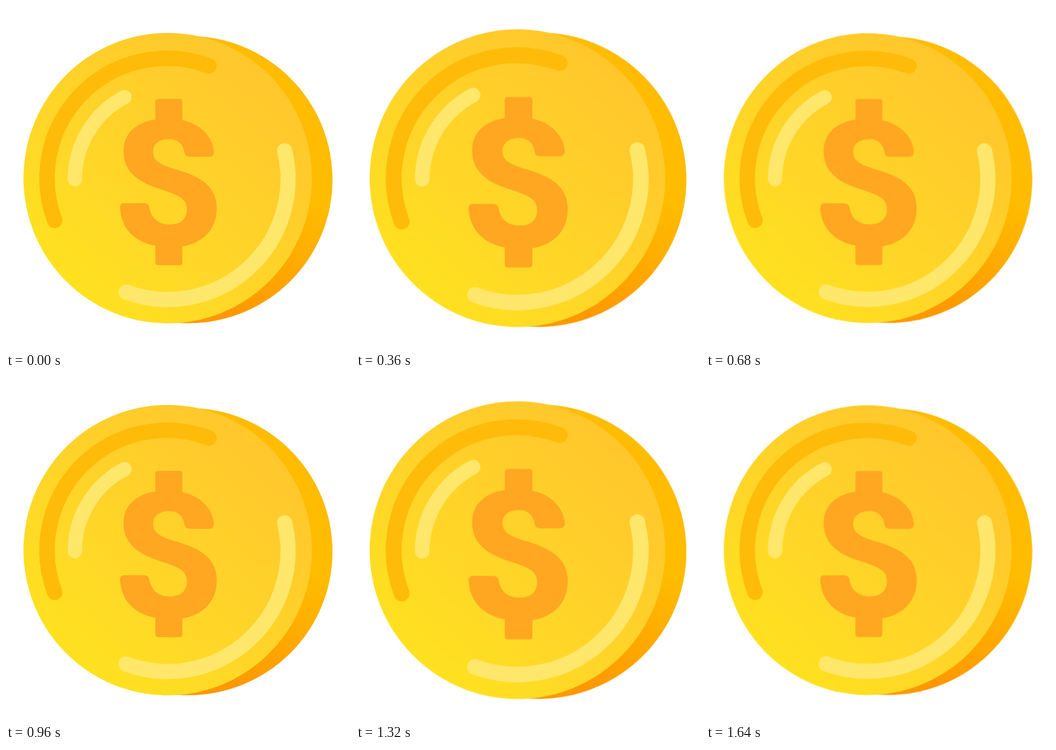
Animation, 600 px wide and 600 px high, one loop 1.92 s. Source, as an HTML page without scripts:

```html
<!DOCTYPE html>
<html lang="en">
<head>
<meta charset="utf-8">
<title>Pulsing coin</title>
<style>
  html, body {
    margin: 0;
    width: 100%;
    height: 100%;
    overflow: hidden;
    background: #fff;
  }
  svg {
    display: block;
    width: 100vw;
    height: 100vh;
  }
  .coin {
    transform-origin: 300px 300px;
    animation: pulse 960ms step-end infinite;
  }
  .arc {
    fill: none;
    stroke-linecap: round;
  }
  .shade { stroke: #ffbb0a; stroke-width: 27; }
  .shine { stroke: #ffe76b; stroke-width: 26.5; }
  .shine.short { stroke-width: 25; }

  /* Swell, rebound and settle, held in 40 ms poses */
  @keyframes pulse {
    0%      { transform: scale(1); }
    4.166%  { transform: scale(1.006); }
    8.333%  { transform: scale(1.021); }
    12.5%   { transform: scale(1.041); }
    16.666% { transform: scale(1.063); }
    20.833% { transform: scale(1.083); }
    25%     { transform: scale(1.098); }
    29.166% { transform: scale(1.104); }
    33.333% { transform: scale(1.077); }
    37.5%   { transform: scale(1.025); }
    41.666% { transform: scale(.982); }
    45.833% { transform: scale(.968); }
    50%     { transform: scale(.986); }
    54.166% { transform: scale(1.009); }
    58.333% { transform: scale(1.02); }
    62.5%   { transform: scale(1.015); }
    66.666% { transform: scale(1.004); }
    70.833%, 100% { transform: scale(.998); }
  }
</style>
</head>
<body>
<svg viewBox="0 0 600 600">
  <defs>
    <linearGradient id="face" gradientUnits="userSpaceOnUse" x1="440" y1="110" x2="110" y2="480">
      <stop offset="0" stop-color="#ffc72c"/>
      <stop offset=".65" stop-color="#ffd728"/>
      <stop offset="1" stop-color="#ffe120"/>
    </linearGradient>
    <linearGradient id="edge" gradientUnits="userSpaceOnUse" x1="520" y1="335" x2="420" y2="545">
      <stop offset="0" stop-color="#ffbc00"/>
      <stop offset="1" stop-color="#ff9800"/>
    </linearGradient>
  </defs>
  <g class="coin">
    <ellipse cx="318" cy="302.8" rx="251.5" ry="250.5" fill="url(#edge)"/>
    <ellipse cx="282" cy="300.2" rx="251.5" ry="253.3" fill="url(#face)"/>
    <path class="arc shade" d="M354 104.5A209 209 0 0 0 85 374"/>
    <path class="arc shine short" d="M206.5 159A162 162 0 0 0 120 302"/>
    <path class="arc shine" d="M486 252.5A210 210 0 0 1 209.5 499"/>
    <path fill="#ffa721" d="M260.5 167q0-5 5-5H302.5q5 0 5 5V199
      C339 206 361 228 362.5 254Q363 263 354 263H321Q313 263 311.5 256
      C309 240 299 232 285 232C267 232 256.5 241 256.5 254
      C256.5 270 268 277 303 287C349 301 367.5 321 367.5 353
      C367.5 389 345 413 307.5 419.5V447q0 5-5 5H265.5q-5 0-5-5V418
      C225 412 200 388 199 351Q199 344 206 344H241Q248 344 250 351
      C253 370 265 381 286 381C305 381 315.5 371 315.5 355
      C315.5 337 305 331 268 319C223 305 205 284 205 253
      C205 223 226 203 260.5 198Z"/>
  </g>
</svg>
</body>
</html>
```
